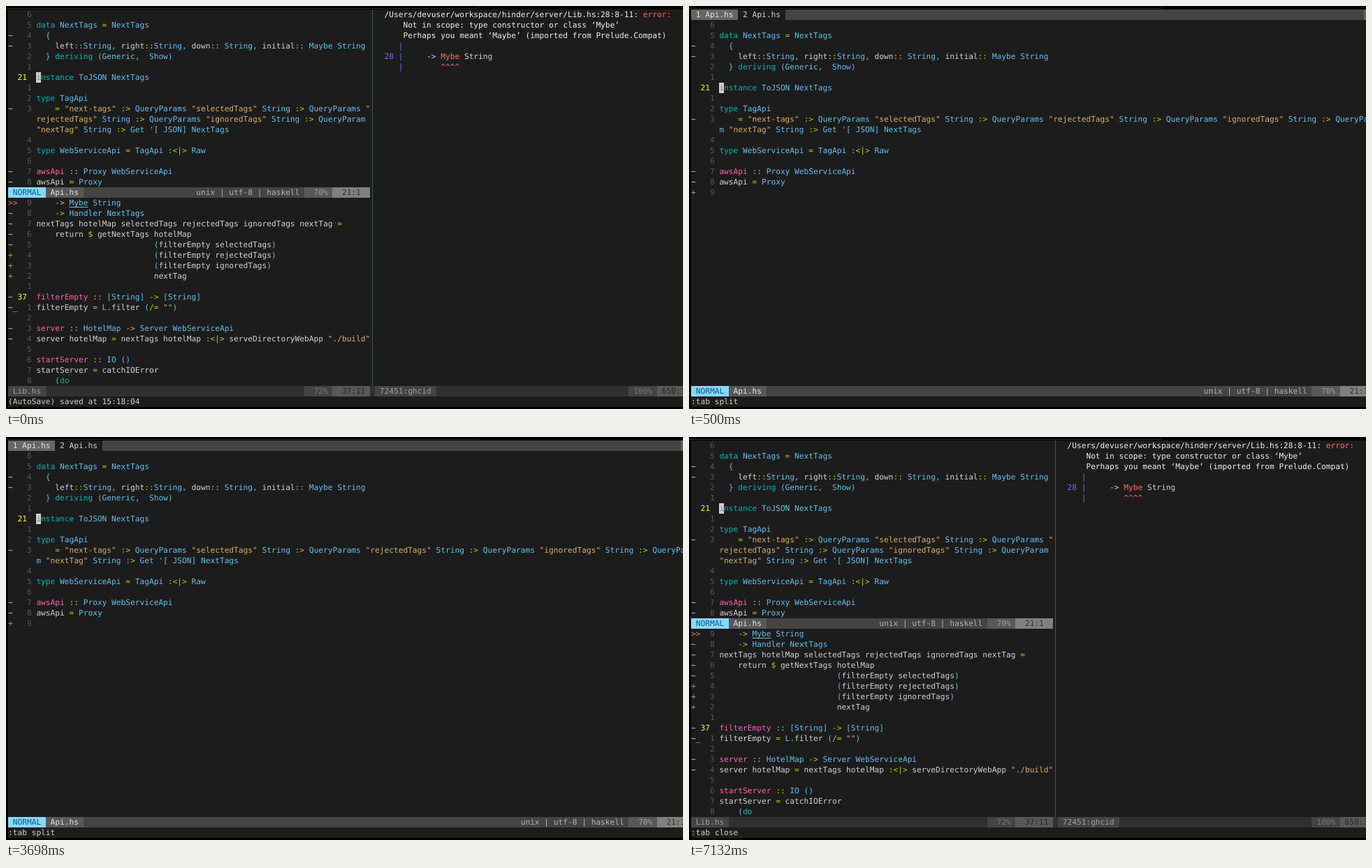
These frames come from a looping animation (969 by 578 pixels, 8 s). An HTML page with a canvas:

```html
<!DOCTYPE html>
<html>
<head>
<meta charset="utf-8">
<style>
  html, body { margin: 0; width: 100%; height: 100%; overflow: hidden; background: #000; }
  canvas { display: block; width: 969px; height: 578px; }
</style>
</head>
<body>
<canvas id="stage"></canvas>
<script>
const LOOP = 8000, TAB_OPENS = 500, TAB_CLOSES = 5830;
const LEFT = 3, TOP = 5, CELL_W = 6.731, CELL_H = 15;
const COLS = 146, SPLIT = 77, GUTTER = 6, STATUS_ROW = 36;

const color = {
  bg: '#1c1c1c', text: '#d0d0d0', bright: '#eeeeee', number: '#585858', current: '#ffff00',
  keyword: '#00b5ad', type: '#62bfed', string: '#d7af5f', operator: '#afd700',
  signature: '#ff5faf', error: '#ff6c60', added: '#5fd700', margin: '#6c6cff'
};

// Each line starts with its two sign-column characters.
const apiLines = [
  '  ',
  '  data NextTags = NextTags',
  '~   {',
  '~     left::String, right::String, down:: String, initial:: Maybe String',
  '    } deriving (Generic,  Show)',
  '  ',
  '  instance ToJSON NextTags',
  '  ',
  '  type TagApi',
  '~     = "next-tags" :> QueryParams "selectedTags" String :> QueryParams "rejectedTags" String' +
    ' :> QueryParams "ignoredTags" String :> QueryParam "nextTag" String :> Get \'[ JSON] NextTags',
  '  ',
  '  type WebServiceApi = TagApi :<|> Raw',
  '  ',
  '~ awsApi :: Proxy WebServiceApi',
  '~ awsApi = Proxy',
  '+ '
];
const argIndent = ' '.repeat(25);
const libLines = [
  '>>    -> Mybe String',
  '~     -> Handler NextTags',
  '~ nextTags hotelMap selectedTags rejectedTags ignoredTags nextTag =',
  '~     return $ getNextTags hotelMap',
  '~ ' + argIndent + '(filterEmpty selectedTags)',
  '+ ' + argIndent + '(filterEmpty rejectedTags)',
  '+ ' + argIndent + '(filterEmpty ignoredTags)',
  '+ ' + argIndent + 'nextTag',
  '  ',
  '~ filterEmpty :: [String] -> [String]',
  '~_filterEmpty = L.filter (/= "")',
  '  ',
  '~ server :: HotelMap -> Server WebServiceApi',
  '~ server hotelMap = nextTags hotelMap :<|> serveDirectoryWebApp "./build"',
  '  ',
  '  startServer :: IO ()',
  '  startServer = catchIOError',
  '      (do'
];

const syntax = [
  ['string', /"[^"]*"/y],
  ['signature', /(?<![^])[a-z]\w*(?= ::)/y],
  ['keyword', /(data|type|instance|deriving|do)\b/y],
  ['type', /[A-Z]\w*/y],
  ['text', /\w+/y],
  ['operator', /[:<>|=\-$\/.]+/y],
  ['type', /[^]/y]
];

const canvas = document.getElementById('stage');
const ctx = canvas.getContext('2d');
const scale = window.devicePixelRatio || 1;
canvas.width = 969 * scale;
canvas.height = 578 * scale;

const colX = col => LEFT + col * CELL_W;
const rowY = row => TOP + row * CELL_H;

function rect(x, y, w, h, fill) {
  ctx.fillStyle = fill;
  ctx.fillRect(x, y, w, h);
}

function cells(col, row, count, fill) {
  const x = Math.round(colX(col));
  rect(x, rowY(row), Math.round(colX(col + count)) - x, CELL_H, fill);
}

function print(col, row, text, fill = color.text) {
  ctx.fillStyle = fill;
  [...text].forEach((char, i) => {
    if (char !== ' ') ctx.fillText(char, colX(col + i), rowY(row) + 11);
  });
}

function tokenize(line) {
  const tokens = [];
  for (let pos = 0; pos < line.length;) {
    for (const [kind, pattern] of syntax) {
      pattern.lastIndex = pos;
      const match = pattern.exec(line);
      if (!match) continue;
      tokens.push({ pos, text: match[0], fill: color[kind] });
      pos += match[0].length;
      break;
    }
  }
  return tokens;
}

function buffer(lines, top, cols, cursor, cursorNumber) {
  const wrap = cols - GUTTER;
  let row = top;
  lines.forEach((line, i) => {
    const sign = line.slice(0, 2), code = line.slice(2);
    print(0, row, sign, { '+': color.added, '>': color.error }[sign[0]]);
    if (i === cursor) print(2, row, cursorNumber, color.current);
    else print(4, row, String(Math.abs(i - cursor)), color.number);
    for (const { pos, text, fill } of tokenize(code)) {
      [...text].forEach((char, k) => {
        const at = pos + k;
        print(GUTTER + at % wrap, row + Math.floor(at / wrap), char, fill);
      });
    }
    row += Math.max(1, Math.ceil(code.length / wrap));
  });
}

function segment(col, row, count, pad, text, fill, ink) {
  cells(col, row, count, fill);
  print(col + pad, row, text, ink);
}

function activeStatus(row, cols) {
  cells(0, row, cols, '#444444');
  segment(0, row, 8, 1, 'NORMAL', '#87d7ff', '#005f87');
  segment(8, row, 8, 1, 'Api.hs', '#585858', '#e4e4e4');
  print(cols - 37, row, 'unix | utf-8 | haskell', '#b2b2b2');
  segment(cols - 14, row, 6, 2, '70%', '#585858', '#9e9e9e');
  segment(cols - 8, row, 8, 2, '21:1', '#808080', '#303030');
}

function inactiveStatus(col, name, percentCol, percentPad, percent, position) {
  cells(col, STATUS_ROW, percentCol + 14 - col, '#303030');
  segment(col, STATUS_ROW, name.length + 2, 1, name, '#444444', '#9e9e9e');
  segment(percentCol, STATUS_ROW, 6, percentPad, percent, '#444444', '#767676');
  segment(percentCol + 6, STATUS_ROW, 8, percentPad, position, '#585858', '#262626');
}

function cursorAt(row) {
  cells(GUTTER, row, 1, color.text);
  print(GUTTER, row, 'i', '#808080');
}

function compilerOutput() {
  print(80, 0, '/Users/devuser/workspace/hinder/server/Lib.hs:28:8-11:', color.bright);
  print(135, 0, 'error:', color.error);
  print(84, 1, 'Not in scope: type constructor or class ‘Mybe’', color.bright);
  print(84, 2, 'Perhaps you meant ‘Maybe’ (imported from Prelude.Compat)', color.bright);
  print(83, 3, '|', color.margin);
  print(80, 4, '28 |', color.margin);
  print(89, 4, '->');
  print(92, 4, 'Mybe', color.error);
  print(97, 4, 'String');
  print(83, 5, '|', color.margin);
  print(92, 5, '^^^^', color.error);
}

function splitView(message) {
  buffer(apiLines.slice(0, -1), 0, SPLIT, 6, '21');
  cursorAt(6);
  activeStatus(17, SPLIT);
  buffer(libLines, 18, SPLIT, 9, '37');
  rect(colX(13), rowY(18) + 13, 4 * CELL_W, 1, color.type);
  rect(524, TOP, 1, STATUS_ROW * CELL_H, '#465457');
  compilerOutput();
  cells(SPLIT, STATUS_ROW, 1, '#303030');
  inactiveStatus(0, 'Lib.hs', 63, 2, '72%', '37:11');
  inactiveStatus(78, '72451:ghcid', 132, 1, '100%', '650:1');
  print(0, 37, message);
}

function tabView() {
  cells(0, 0, COLS, '#444444');
  segment(0, 0, 10, 1, '1 Api.hs', '#666666', '#e4e4e4');
  segment(10, 0, 10, 1, '2 Api.hs', color.bg, color.text);
  rect(966, TOP, 3, CELL_H, '#666666');
  buffer(apiLines, 1, COLS, 6, '21');
  cursorAt(7);
  activeStatus(STATUS_ROW, COLS);
  print(0, 37, ':tab split');
}

const scenes = {
  before: () => splitView('(AutoSave) saved at 15:18:04'),
  tab: tabView,
  after: () => splitView(':tab close')
};

function draw(scene) {
  ctx.setTransform(scale, 0, 0, scale, 0, 0);
  ctx.font = '11.18px "DejaVu Sans Mono", monospace';
  ctx.textRendering = 'geometricPrecision';
  rect(0, 0, 969, 578, '#000');
  rect(0, 3, 677, 1, '#2a2a2a');
  rect(676, 0, 1, 4, '#2a2a2a');
  rect(LEFT, TOP, 966, 570, color.bg);
  scenes[scene]();
}

let shown;
const start = performance.now();
function tick() {
  const t = (performance.now() - start) % LOOP;
  const scene = t < TAB_OPENS ? 'before' : t < TAB_CLOSES ? 'tab' : 'after';
  if (scene !== shown) draw(shown = scene);
  requestAnimationFrame(tick);
}
tick();
</script>
</body>
</html>
```
